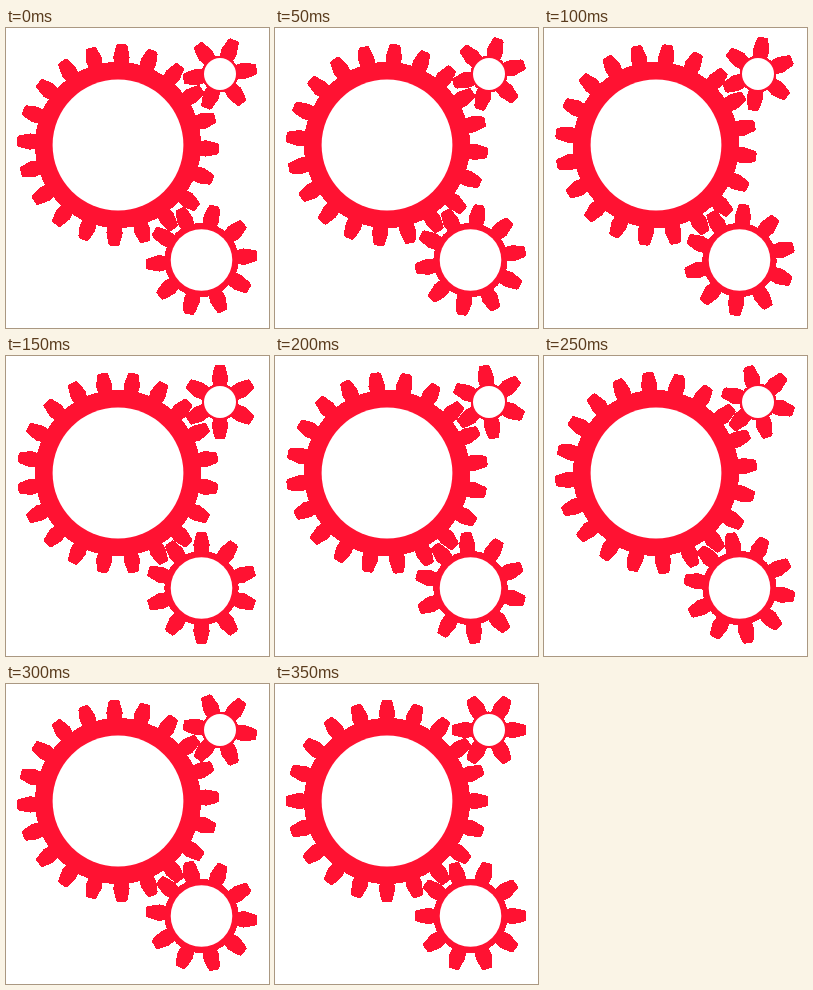
Animation of 263x300 px, one loop 0.4 s. Source, as an HTML page:

```html
<!DOCTYPE html>
<html lang="en">
<head>
<meta charset="utf-8">
<title>Gears</title>
<style>
html, body { margin: 0; width: 100%; height: 100%; overflow: hidden; background: #fff; }
svg { display: block; width: 100vw; height: 100vh; }
.gear { fill: #ff1232; shape-rendering: crispEdges; }
.hole { fill: #fff; }
</style>
</head>
<body>
<svg id="stage" viewBox="0 0 263 300"></svg>
<script>
const LOOP = 400, STEPS = 8;
const NS = 'http://www.w3.org/2000/svg';
const stage = document.getElementById('stage');

// dir: 1 turns clockwise; phase: angle at the last step of the loop
const gears = [
  { x: 112, y: 117, hole: 65.4, body: 83.1, tip: 101, teeth: 20, dir: 1, phase: 0 },
  { x: 214, y: 46, hole: 16, body: 18.5, tip: 37, teeth: 6, dir: -1, phase: 30 },
  { x: 195.5, y: 232, hole: 30.8, body: 37.2, tip: 55.8, teeth: 10, dir: -1, phase: 18 }
];

function add(parent, tag, attrs) {
  const el = document.createElementNS(NS, tag);
  for (const key in attrs) el.setAttribute(key, attrs[key]);
  return parent.appendChild(el);
}

// One tooth pointing up: slim foot, wider shoulder, tapered rounded tip
function toothPath({ body, tip }) {
  const foot = 2 - body, shoulder = 13 - tip, neck = 2.5 - tip;
  return `M-7 ${foot}L-8.2 ${shoulder}L-5.8 ${neck}Q-5.3 ${-tip} -3.5 ${-tip}` +
    `H3.5Q5.3 ${-tip} 5.8 ${neck}L8.2 ${shoulder}L7 ${foot}Z`;
}

for (const g of gears) {
  const group = add(stage, 'g', { transform: `translate(${g.x} ${g.y})` });
  g.wheel = add(group, 'g', { class: 'gear' });
  add(g.wheel, 'circle', { r: g.body });
  const d = toothPath(g);
  for (let i = 0; i < g.teeth; i++) {
    add(g.wheel, 'path', { d, transform: `rotate(${i * 360 / g.teeth})` });
  }
  add(group, 'circle', { class: 'hole', r: g.hole });
}

function draw(time) {
  const step = Math.floor(time % LOOP / LOOP * STEPS) + 1;
  for (const g of gears) {
    const pitch = 360 / g.teeth;
    const angle = g.phase + g.dir * pitch * step / STEPS;
    g.wheel.setAttribute('transform', `rotate(${angle})`);
  }
}

const start = performance.now();
function tick() {
  draw(performance.now() - start);
  requestAnimationFrame(tick);
}
tick();
</script>
</body>
</html>
```
